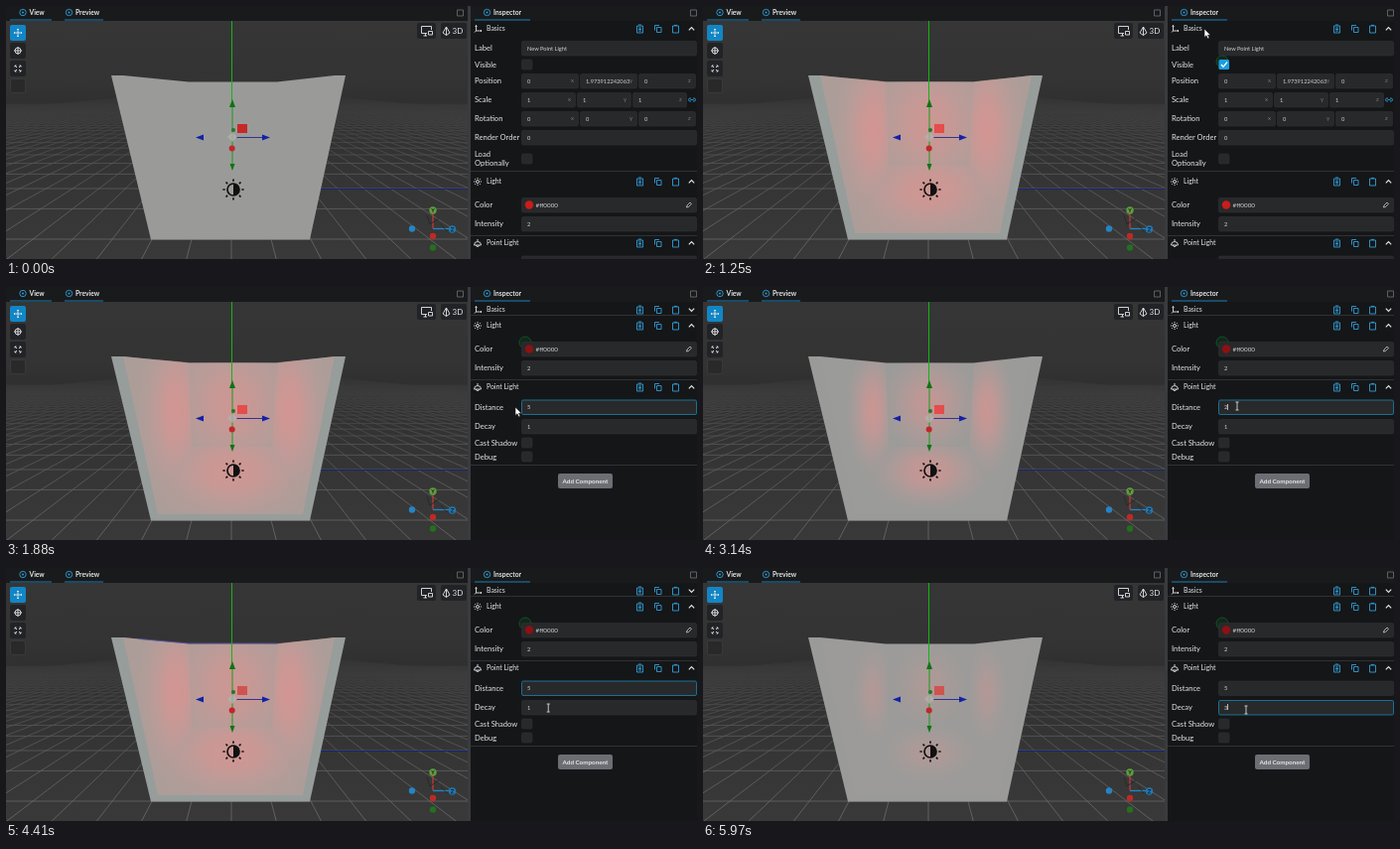
Recreate the animation shown at these times as an HTML page. Size 696x255 px, loop 6.3 s.

```html
<!DOCTYPE html>
<html lang="en">
<head>
<meta charset="utf-8">
<title>Point light editor</title>
<style>
html, body { margin: 0; width: 100%; height: 100%; overflow: hidden; background: #151618; }
svg { display: block; width: 696px; height: 255px; }
text { font: 7.6px Lato, sans-serif; fill: #e4e5e7; white-space: pre; }
.head { font-size: 6.9px; }
.bold { font-size: 6.7px; font-weight: 700; }
.value { font-size: 5.7px; fill: #d2d3d5; }
.hex { font-size: 6.3px; }
.axis { font-size: 6px; fill: #77797c; }
.field { fill: #28292b; stroke: #303134; stroke-width: .6; }
.focus { stroke: #1a7092; stroke-width: 1; }
.rule { stroke: #303236; }
.icon { fill: none; stroke: #e4e5e7; stroke-width: .9; }
.blue { stroke: #2f9fd8; }
</style>
</head>
<body>
<svg viewBox="0 0 696 255">
  <defs>
    <linearGradient id="sky" x2="0" y2="1">
      <stop offset="0" stop-color="#363636"/>
      <stop offset=".27" stop-color="#333"/>
      <stop offset=".33" stop-color="#303030"/>
      <stop offset="1" stop-color="#393939"/>
    </linearGradient>
    <linearGradient id="fade" x2="0" y2="1">
      <stop offset="0" stop-color="#fff" stop-opacity="0"/>
      <stop offset=".1" stop-color="#fff" stop-opacity=".15"/>
      <stop offset=".5" stop-color="#fff" stop-opacity=".65"/>
      <stop offset="1" stop-color="#fff"/>
    </linearGradient>
    <radialGradient id="glow">
      <stop offset="0" stop-color="#dd9390"/>
      <stop offset=".3" stop-color="#d99592" stop-opacity=".84"/>
      <stop offset=".65" stop-color="#d09a97" stop-opacity=".38"/>
      <stop offset="1" stop-color="#c09b98" stop-opacity="0"/>
    </radialGradient>
    <mask id="far"><rect y="84" width="465" height="171" fill="url(#fade)"/></mask>
    <clipPath id="view"><rect y="15" width="465" height="240"/></clipPath>
    <clipPath id="bodyClip"><rect id="bodyRect" x="468" y="30" width="228" height="138"/></clipPath>
  </defs>

  <g clip-path="url(#view)">
    <rect y="15" width="465" height="240" fill="url(#sky)"/>
    <g mask="url(#far)"><path id="grid" fill="none" stroke="#6e6e6e" stroke-width=".8"/></g>
    <path d="M313 184.500H465" stroke="#14247c"/>
    <path id="shell" d="M106 70H118L184 76.500H273L331 70H342L306 235.500H146Z"/>
    <path id="wash" d="M118 70L184 76.500H273L331 70L299 229H153Z" fill="#c49d9a"/>
    <g id="walls"></g>
    <path id="edge" d="M134 71.500L184 76H273" fill="none" stroke="#5356a6" stroke-width=".9"/>

    <path d="M227.500 15V96" stroke="#12b512"/>
    <path d="M228 100V163" stroke="#1c9a1c"/>
    <path d="M225 102L228 94L231 102ZM225.500 159H230.500L228 166Z" fill="#0d7413"/>
    <path d="M232 132.500H259" stroke="#26298c" stroke-width=".9"/>
    <path d="M199 129.500L191 132.500L199 135.500ZM258 129.500L266 132.500L258 135.500Z" fill="#1420a8"/>
    <path d="M228 127L233 132L228 137L223 132Z" fill="#b4b2b0" opacity=".75"/>
    <circle cx="229" cy="125" r="2" fill="#27732a"/>
    <rect id="handle" x="233" y="119" width="10" height="9"/>
    <circle cx="227.700" cy="143.500" r="3" fill="#c3262a"/>
    <g transform="translate(229 185)">
      <circle r="6" fill="none" stroke="#111" stroke-width="1.700"/>
      <path d="M0-6A6 6 0 0 1 0 6Z" fill="#111"/>
      <path id="rays" stroke="#111" stroke-width="1.700"/>
    </g>

    <path d="M430 208V224" stroke="#c43a34" stroke-width="1.300"/>
    <path d="M430 224.500H447" stroke="#2386c8" stroke-width="1.300"/>
    <g fill="none" stroke="#242628" stroke-width=".8"><path d="M424 211L427 220L436 214M438 220L444 227"/></g>
    <circle cx="430" cy="206" r="3.700" fill="#5f9d3d"/>
    <circle cx="409" cy="224.500" r="3.200" fill="#2484c6"/>
    <circle cx="449.500" cy="225" r="3.700" fill="#1f78b4"/>
    <circle cx="430" cy="232" r="3.200" fill="#bd2a26"/>
    <circle cx="430" cy="243.500" r="3.200" fill="#246f20"/>
    <path d="M428.500 204L430 206V208M430 206L431.500 204M448 223.500H451L448 227H451" class="icon" style="stroke:#202a26"/>

    <rect x="4" y="19" width="16" height="16" rx="2" fill="#1186c6"/>
    <g fill="#222326">
      <rect x="4" y="37" width="16" height="16" rx="2"/>
      <rect x="4" y="55" width="16" height="16" rx="2"/>
      <rect x="4.500" y="73.500" width="15" height="14" rx="2" fill="#292929" stroke="#404040" stroke-width=".7"/>
      <rect x="414" y="17" width="19" height="16" rx="2"/>
      <rect x="438" y="17" width="26" height="16" rx="2"/>
    </g>
    <g class="icon">
      <path d="M12 23V31M8 27H16M11 24L12 23L13 24M11 30L12 31L13 30M9 26L8 27L9 28M15 26L16 27L15 28"/>
      <circle cx="12" cy="45" r="3"/><path d="M12 41V49M8 45H16"/>
      <path d="M9 61.500V60H10.500M13.500 60H15V61.500M15 64.500V66H13.500M10.500 66H9V64.500M9 60L11 62M15 60L13 62M9 66L11 64M15 66L13 64"/>
      <path d="M424 27.500H418.500V20.500H428.500V24M420.500 30H424M422.500 27.500V30M425.500 25.500H429.500V29H425.500Z"/>
      <path d="M443.500 21L447 27L443.500 29.500L440 27ZM443.500 21V29.500"/>
    </g>
    <text x="449.500" y="27.700" style="font-size:8px">3D</text>
  </g>

  <rect width="696" height="15" fill="#191a1c"/>
  <rect x="468" y="15" width="228" height="240" fill="#151618"/>
  <rect x="465" width="3" height="255" fill="#3a3b3e"/>
  <g id="tabs"></g>
  <circle id="ripple" cx="523" cy="56" r="6" fill="#11281a" stroke="#14502a"/>
  <g id="basicsHead"></g>
  <g clip-path="url(#bodyClip)"><g id="basics"></g></g>
  <g id="rest"></g>
  <path id="arrow" d="M0 0V8.500L2 6.800L3.500 10L5 9.300L3.600 6.200H6.200Z" fill="#fff" stroke="#111" stroke-width=".6"/>
  <path id="beam" d="M-1.500-4H1.500M0-4V4M-1.500 4H1.500" fill="none" stroke="#d8d8d8" stroke-width=".9"/>
</svg>
<script>
const LOOP = 6300, TICK = 69.4, OPEN = 138;
const $ = id => document.getElementById(id);
const add = (id, html) => $(id).insertAdjacentHTML('beforeend', html);

// Markup helpers; y is the middle of the row.
const text = (x, y, s, cls = '', id = '') =>
  `<text x="${x}" y="${y + 2.5}" class="${cls}" id="${id}">${s}</text>`;
const value = (x, y, s, id) => text(x, y - .4, s, 'value', id);
const box = (x, y, w, id = '') =>
  `<rect x="${x + .5}" y="${y - 7}" width="${w}" height="14.500" rx="1.500" class="field" id="${id}"/>`;
const check = y => `<rect x="519.500" y="${y - 5}" width="10.500" height="10" rx="1.500" class="field"/>`;
const rule = y => `<path d="M468 ${y}H696" class="rule"/>`;
const row = (y, label, val, id = '') =>
  text(472, y, label) + box(519, y, 176, id && id + 'Box') + value(525, y, val, id);
const triple = (y, label, vals, step, width) => text(472, y, label) + vals.map((v, i) => {
  const x = 519 + i * step;
  return box(x, y, width) + value(x + 6, y, v) + text(x + width - 7, y - .6, 'xyz'[i], 'axis');
}).join('');

function header(y, name, glyph, chevron = '') {
  return `<g transform="translate(475 ${y})"><path class="icon" d="${glyph}"/></g>` +
    text(484, y - .3, name, 'head') +
    `<g class="icon blue" transform="translate(0 ${y})">
      <path d="M635.500-3H641.500V4H635.500ZM637-4H640M637-1H640M637 .5H640M637 2H640"/>
      <path d="M655.500-1.500H660V3.500H655.500ZM653.500 1.500V-3.500H658"/>
      <path d="M671.500-3H677.500V4H671.500ZM673-3.600H676"/></g>
    <path class="icon" style="stroke-width:1.200" id="${chevron}" transform="translate(690.500 ${y})" d="M-2.700 1.400L0-1.300L2.700 1.400"/>`;
}

const tab = (x, name, left, right) =>
  `<circle cx="${x}" cy="6.500" r="3.200" class="icon blue"/><circle cx="${x}" cy="6.500" r="1" fill="#2f9fd8"/>
  <path d="M${left} 14H${right}" stroke="#1a7cb2"/>` + text(x + 6.5, 6.2, name, 'bold');
add('tabs', tab(17, 'View', 4, 46) + tab(63.5, 'Preview', 59, 98) + tab(484.5, 'Inspector', 472, 528) +
  '<path d="M454.500 4H460.500V10H454.500ZM689.500 4H695.500V10H689.500Z" fill="none" stroke="#707275" stroke-width=".8"/>');

const SUN = 'M-1.500 0A1.500 1.500 0 1 0 1.500 0A1.500 1.500 0 1 0-1.500 0M0-4V-2.700M0 4V2.700M-4 0H-2.700M4 0H2.700' +
  'M-2.800-2.800L-2-2M2.800 2.800L2 2M-2.800 2.800L-2 2M2.800-2.800L2-2';
add('basicsHead', header(23, 'Basics', 'M-1.500-3.500V2H4M-1.500 2L-3 3.500M-2.500-2.500L-1.500-3.500L-.5-2.500M3 1L4 2L3 3', 'chevron'));
add('basics',
  row(42.5, 'Label', 'New Point Light') +
  text(472, 59, 'Visible') + check(59) +
  `<g id="tick"><rect x="519.500" y="54" width="10.500" height="10" rx="1.500" fill="#189fe2"/>
   <path d="M522 59L524 61.300L528 56.500" fill="none" stroke="#fff" stroke-width="1.300"/></g>` +
  triple(75.5, 'Position', [0, '1.973912242063', 0], 59, 57) +
  triple(94.5, 'Scale', [1, 1, 1], 56, 54) +
  '<path d="M690 93H689A1.500 1.500 0 0 0 689 96H690M692 93H693A1.500 1.500 0 0 1 693 96H692M689.500 94.500H692.500" class="icon blue"/>' +
  triple(113.5, 'Rotation', [0, 0, 0], 59, 57) +
  row(132.5, 'Render Order', '0') +
  text(472, 149, 'Load') + text(472, 158.5, 'Optionally') + check(154));
add('rest', rule(28.5) + header(39, 'Light', SUN) +
  text(472, 62.5, 'Color') + box(519, 62.5, 176) +
  '<circle id="swatch" cx="527" cy="62.500" r="4.200"/>' + text(533.5, 62.3, '#ff0000', 'value hex') +
  '<path d="M685.500 65L686 63L689 60L690.500 61.500L687.500 64.500Z" class="icon" style="stroke-width:.7"/>' +
  row(81.5, 'Intensity', '2') + rule(93.5) +
  header(101, 'Point Light', 'M-3.500 2H3.500A3.500 3.500 0 0 0-3.500 2M0-4V-2M-1.500 2A1.500 1.500 0 0 0 1.500 2') +
  row(121, 'Distance', '5', 'dist') + row(140.5, 'Decay', '1', 'decay') +
  text(472, 157, 'Cast Shadow') + check(157) + text(472, 171, 'Debug') + check(171) + rule(179.5) +
  '<rect x="556" y="188" width="55" height="15" rx="2" fill="#6d6e74"/>' +
  '<text x="583.500" y="197.800" class="bold" text-anchor="middle" style="font-size:6.300px">Add Component</text>' +
  '<path id="caret" stroke="#ddd" stroke-width=".8"/>');

// Unit ground grid: camera 6 units from the blue axis, horizon at y = 82.
let lines = '';
for (let z = -30; z <= 2; z++) lines += `M0 ${(82 + 612 / (6 - z)).toFixed(1)}H465`;
for (let x = -40; x <= 40; x++) lines += `M${227 + x * 1.5} 87.700L${227 + x * 45.2} 255`;
$('grid').setAttribute('d', lines);

let rays = '';
for (let i = 0; i < 8; i++) {
  const a = i * Math.PI / 4, c = Math.cos(a), s = Math.sin(a);
  rays += `M${8.3 * c} ${8.3 * s}L${10.6 * c} ${10.6 * s}`;
}
$('rays').setAttribute('d', rays);

// Inner faces: outline, glow centre, radii and strength.
const faces = [
  ['118,70 184,76 187,161 153,229', 171, 125, 38, 94, 1],
  ['331,70 273,76 268,161 299,229', 286, 125, 38, 94, 1],
  ['184,76 273,76 268,161 187,161', 228, 118, 70, 78, .85],
  ['187,161 268,161 299,229 153,229', 228, 186, 86, 56, .95]
];
faces.forEach(([pts, x, y], i) => add('walls',
  `<clipPath id="face${i}"><polygon points="${pts}"/></clipPath>
   <g clip-path="url(#face${i})"><ellipse id="glow${i}" cx="${x}" cy="${y}" fill="url(#glow)"/></g>`));

// Start time, distance, decay, wash, glow size, glow strength.
const LIGHT = [
  [0, 5, 1, 0, 0, 0],
  [770, 5, 1, .5, 1, .8],
  [2270, 4, 1, .34, .94, .78],
  [2600, 3, 1, .15, .84, .75],
  [3070, 2, 1, .03, .72, .72],
  [3410, 3, 1, .15, .84, .75],
  [3540, 4, 1, .34, .94, .78],
  [3670, 5, 1, .5, 1, .8],
  [5090, 5, 2, .14, .76, .52],
  [5710, 5, 3, .07, .52, .34]
];
// Pointer keys: time, x, y.
const PATH = [
  [69, 638, 224], [347, 562, 124], [555, 508, 66], [694, 521, 57], [833, 521, 57],
  [1249, 505, 23], [1388, 506, 31], [1874, 513, 121], [2140, 513, 121], [2220, 538, 120],
  [4070, 538, 120], [4400, 547, 143]
];

const last = (table, t) => table.findLast(k => k[0] <= t) || table[0];
function pointer(t) {
  const i = PATH.findIndex(k => k[0] > t);
  if (i < 1) return (i ? PATH.at(-1) : PATH[0]).slice(1);
  const [t0, x0, y0] = PATH[i - 1], [t1, x1, y1] = PATH[i], p = (t - t0) / (t1 - t0);
  return [x0 + (x1 - x0) * p, y0 + (y1 - y0) * p];
}

const set = (id, attrs) => { for (const k in attrs) $(id).setAttribute(k, attrs[k]); };
const show = (id, on) => set(id, { visibility: on ? 'visible' : 'hidden' });

function draw(t) {
  const [, dist, decay, wash, size, power] = last(LIGHT, t);
  set('shell', { fill: wash > .4 ? '#979d9a' : '#9a9b99' });
  set('wash', { opacity: wash });
  set('handle', { fill: !power ? '#c62828' : t >= 3670 ? '#cf5450' : '#e44d4c' });
  faces.forEach(([, , , rx, ry, k], i) => set('glow' + i, { rx: rx * size, ry: ry * size, opacity: k * power }));
  show('edge', t >= 3670 && t < 5090);

  const [, dy, alpha] = last([[0, OPEN, 1], [1385, 40, .25], [1455, 0, 0]], t);
  set('rest', { transform: `translate(0 ${dy})` });
  set('bodyRect', { height: dy });
  set('basics', { opacity: alpha });
  set('chevron', { transform: `translate(690.5 23) scale(1 ${dy === OPEN ? 1 : -1})` });
  set('swatch', { fill: t < 1385 ? '#c81e1c' : t < 1455 ? '#b01c16' : '#8c1114' });
  show('tick', t >= 770);
  show('ripple', t >= 770);

  $('dist').textContent = dist;
  $('decay').textContent = decay;
  $('distBox').classList.toggle('focus', t >= 1875 && t < 4550);
  $('decayBox').classList.toggle('focus', t >= 4550);
  show('caret', t >= 2270 && t < 3670 || t >= 5090);
  set('caret', { d: t < 4550 ? 'M528.500 118V124' : 'M528.500 137V143' });

  const [x, y] = pointer(Math.floor(t / TICK) * TICK);
  const typing = t >= 2210;
  set('arrow', { transform: `translate(${x} ${y})` });
  set('beam', { transform: `translate(${x} ${y})` });
  show('arrow', t >= 70 && !typing);
  show('beam', typing);
}

const start = performance.now();
function frame(now) {
  draw(Math.max(0, now - start) % LOOP);
  requestAnimationFrame(frame);
}
draw(0);
requestAnimationFrame(frame);
</script>
</body>
</html>
```
